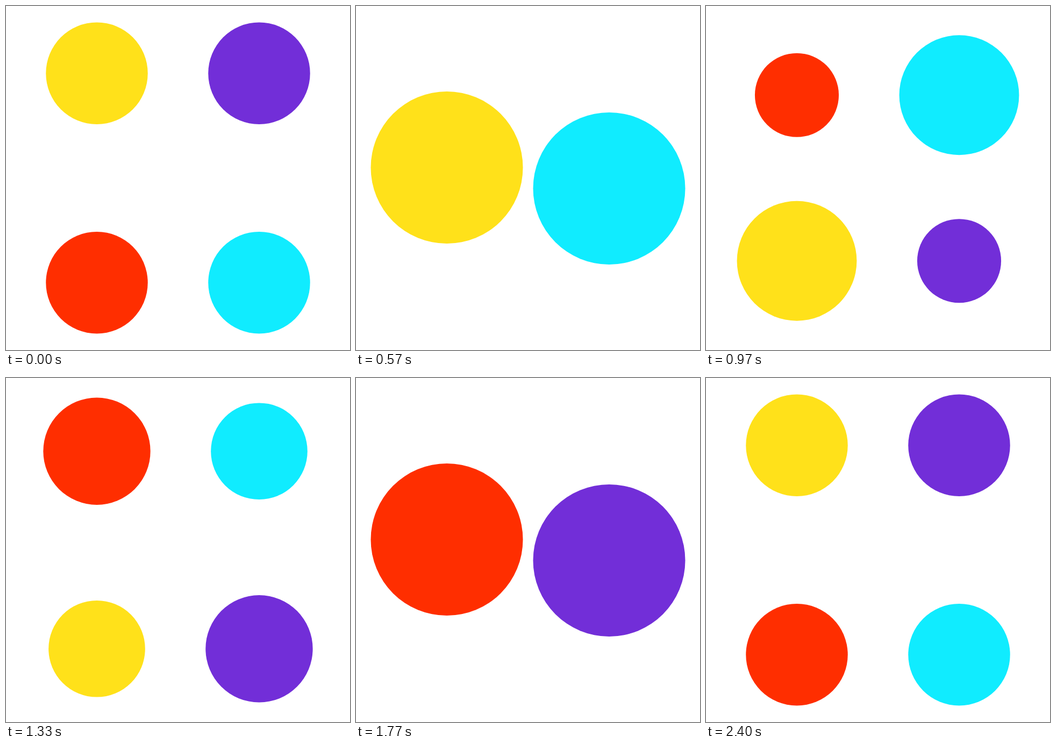
An HTML page that plays this animation: 640x640 px, repeating every 2.43 s.

```html
<!DOCTYPE html>
<html>
<head>
<meta charset="utf-8">
<style>
  html, body { margin: 0; width: 100%; height: 100%; overflow: hidden; background: #fff; }
  svg { display: block; width: 100vw; height: 100vh; }
</style>
</head>
<body>
<svg viewBox="0 0 640 640"></svg>
<script>
const LOOP = 2430, STEPS = 60;
const CENTER = 320, SWING = 194.7, RADIUS = 94.75;
const svg = document.querySelector('svg');

// dir -1 starts at the top, +1 at the bottom; phase 0 passes in front first
const discs = [
  { x: 169, dir: -1, phase: 0, color: '#ffe11a' },
  { x: 169, dir: -1, phase: 0.5, color: '#ff2e00' },
  { x: 471, dir: 1, phase: 0, color: '#10ecff' },
  { x: 471, dir: 1, phase: 0.5, color: '#722ed8' },
].map(disc => {
  const node = svg.appendChild(document.createElementNS('http://www.w3.org/2000/svg', 'circle'));
  node.setAttribute('cx', disc.x);
  node.setAttribute('fill', disc.color);
  return { ...disc, node };
});

const ease = u => u * u * (3 - 2 * u);
// Eased 0 to 1 and back over one cycle
const swing = p => ease(1 - Math.abs(1 - 2 * p));

// 25 steps per second, shown on a 30 per second clock
function cycleAt(ms) {
  const tick = Math.floor((3 * Math.floor(ms / 10) + 1) / 10);
  return Math.ceil((5 * tick - 3) / 6) / STEPS;
}

function draw(cycle) {
  for (const disc of discs) {
    const p = (cycle + disc.phase) % 1;
    const near = p < 0.5 ? 1 : -1;
    const depth = near * swing((p * 2) % 1);
    disc.node.setAttribute('cy', CENTER + disc.dir * SWING * (1 - 2 * swing(p)));
    disc.node.setAttribute('r', RADIUS * (1 + depth / 2));
    disc.near = near;
  }
  const order = [...discs].sort((a, b) => a.near - b.near);
  svg.append(...order.map(disc => disc.node));
}

function frame() {
  draw(cycleAt(performance.now() % LOOP));
  requestAnimationFrame(frame);
}
frame();
</script>
</body>
</html>
```
